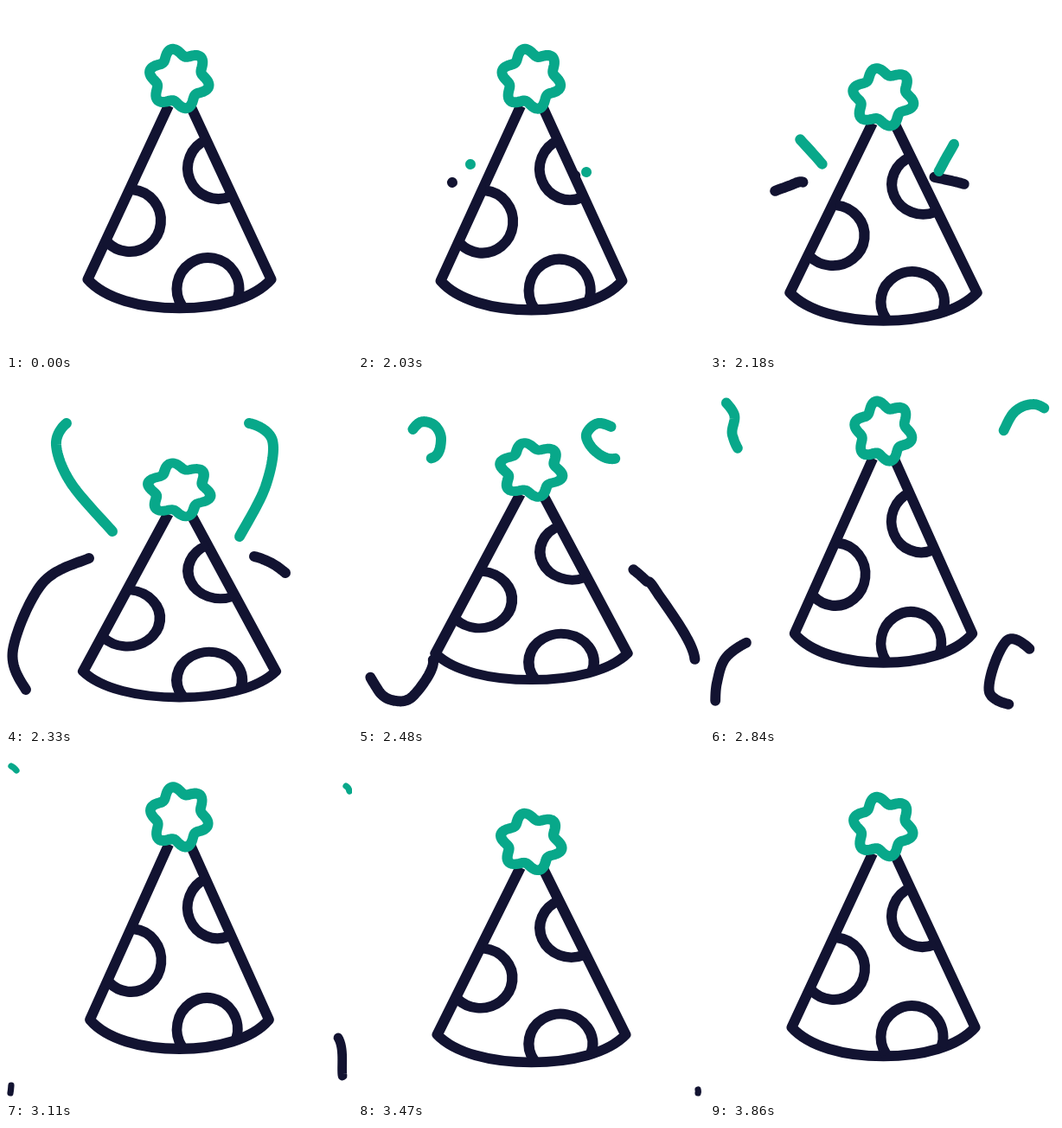
An HTML page with a canvas that plays this animation: 400 by 400 pixels, repeating every 3.89 s.

```html
<!DOCTYPE html>
<html lang="en">
<head>
<meta charset="utf-8">
<title>Party hat</title>
<style>
html, body { margin: 0; width: 100%; height: 100%; overflow: hidden; background: #fff; }
canvas { display: block; width: 100vmin; height: 100vmin; margin: 0 auto; }
</style>
</head>
<body>
<canvas id="stage" width="400" height="400"></canvas>
<script>
const ctx = document.getElementById('stage').getContext('2d');
const LOOP = 3890, START = 2030, STEP = 30;
const DARK = '#121331', GREEN = '#08a88a', LINE = 12;
const rad = Math.PI / 180;

// time, drop, squash
const BOUNCE = [
  [2000, 0, 0], [2030, 1, -0.01], [2330, 32, 0.05], [2600, -11, 0.04],
  [2820, -24, -0.03], [3110, -10, -0.024], [3470, 13, 0.027], [3860, 0, 0]
];

// time, tail, head: the visible stretch of every streamer, in path points
const FLIGHT = [
  [2030, 0, 0], [2330, 1, 4], [2600, 6, 9], [3110, 11, 12],
  [3180, 12, 12.5], [3470, 13, 14], [3650, 14, 14]
];

const STREAMERS = [
  { color: DARK, path: [
    [251, 196], [287, 204], [299, 208], [311, 214], [323, 223], [333, 232], [344, 243], [389, 320],
    [367, 373], [323, 361], [345, 300], [384, 328], [389, 372], [393, 388], [393, 392]] },
  { color: DARK, path: [
    [109, 204], [96, 206], [42, 235], [8, 312], [23, 358], [44, 371], [65, 364],
    [87, 325], [60, 299], [21, 318], [8, 350], [6, 383], [5, 392]] },
  { color: GREEN, path: [
    [130, 183], [123, 175], [75, 119], [58, 75], [70, 50], [88, 52], [96, 69],
    [86, 90], [42, 88], [26, 64], [28, 40], [12, 19], [6, 14]] },
  { color: GREEN, path: [
    [264, 192], [270, 181], [300, 123], [308, 70], [281, 50], [264, 63], [274, 82],
    [296, 91], [329, 75], [351, 38], [374, 28], [393, 37], [397, 43]] }
];

// Monotone cubic through column c of the keys
function track(keys, c, t) {
  const last = keys.length - 1;
  if (t <= keys[0][0]) return keys[0][c];
  if (t >= keys[last][0]) return keys[last][c];
  let i = 0;
  while (t >= keys[i + 1][0]) i++;
  const rate = k => (keys[k + 1][c] - keys[k][c]) / (keys[k + 1][0] - keys[k][0]);
  const slope = k => {
    if (k === 0 || k === last) return 0;
    const a = rate(k - 1), b = rate(k);
    return a * b <= 0 ? 0 : 2 * a * b / (a + b);
  };
  const h = keys[i + 1][0] - keys[i][0], u = (t - keys[i][0]) / h, v = 1 - u;
  return v * v * (1 + 2 * u) * keys[i][c] + u * u * (3 - 2 * u) * keys[i + 1][c]
    + h * u * v * (v * slope(i) - u * slope(i + 1));
}

// Catmull-Rom position at point number u
function along(path, u) {
  const n = path.length - 1;
  const i = Math.min(n - 1, Math.floor(u)), f = u - i;
  const a = path[Math.max(0, i - 1)], b = path[i], c = path[i + 1], d = path[Math.min(n, i + 2)];
  return [0, 1].map(k => b[k] + f / 2 * (c[k] - a[k]
    + f * (2 * a[k] - 5 * b[k] + 4 * c[k] - d[k]
    + f * (3 * (b[k] - c[k]) + d[k] - a[k]))));
}

function drawStreamer({ color, path }, t) {
  const end = path.length - 1;
  const tail = track(FLIGHT, 1, t);
  if (t < START || tail >= end) return;
  const head = Math.min(end, Math.max(tail + 0.01, track(FLIGHT, 2, t)));
  const steps = Math.ceil((head - tail) * 16);
  ctx.beginPath();
  for (let i = 0; i <= steps; i++) {
    ctx.lineTo(...along(path, tail + (head - tail) * i / steps));
  }
  ctx.lineCap = 'round';
  ctx.strokeStyle = color;
  ctx.lineWidth = LINE * Math.min(1, 0.45 + 0.15 * (end - tail));
  ctx.stroke();
}

function arc(x, y, r, from, to, back) {
  ctx.beginPath();
  ctx.arc(x, y, r, from * rad, to * rad, back);
  ctx.stroke();
}

function drawHat(t) {
  const squash = track(BOUNCE, 2, t);
  ctx.save();
  ctx.translate(200.5, 199 + track(BOUNCE, 1, t));
  ctx.scale(1 + squash, 1 - squash * (0.9 + 20 * squash));
  ctx.translate(-200.5, -199);
  ctx.lineWidth = LINE;
  ctx.lineCap = 'butt';
  ctx.strokeStyle = DARK;

  ctx.beginPath();
  ctx.moveTo(188, 115);
  ctx.lineTo(94.5, 316);
  ctx.bezierCurveTo(114, 338, 155, 349.3, 200.5, 349.3);
  ctx.bezierCurveTo(246, 349.3, 287, 338, 306.5, 316);
  ctx.lineTo(213, 115);
  ctx.stroke();

  arc(143, 248, 36, -84, 136);
  arc(245.5, 187.5, 35.5, -113, 64, true);
  arc(233.5, 327, 36, 146, 380);

  ctx.strokeStyle = GREEN;
  ctx.beginPath();
  for (let a = 0; a < 360; a += 3) {
    const r = 30.7 + 4.5 * Math.cos(6 * (a - 15) * rad);
    ctx.lineTo(200.3 + r * Math.cos(a * rad), 84 + r * Math.sin(a * rad));
  }
  ctx.closePath();
  ctx.stroke();
  ctx.restore();
}

function draw(now) {
  let t = now % LOOP;
  t = t < START ? 0 : START + Math.floor((t - START) / STEP) * STEP;
  ctx.fillStyle = '#fff';
  ctx.fillRect(0, 0, 400, 400);
  STREAMERS.forEach(s => drawStreamer(s, t));
  drawHat(t);
}

ctx.lineJoin = 'round';
const begin = performance.now();
function tick() {
  draw(performance.now() - begin);
  requestAnimationFrame(tick);
}
tick();
</script>
</body>
</html>
```
